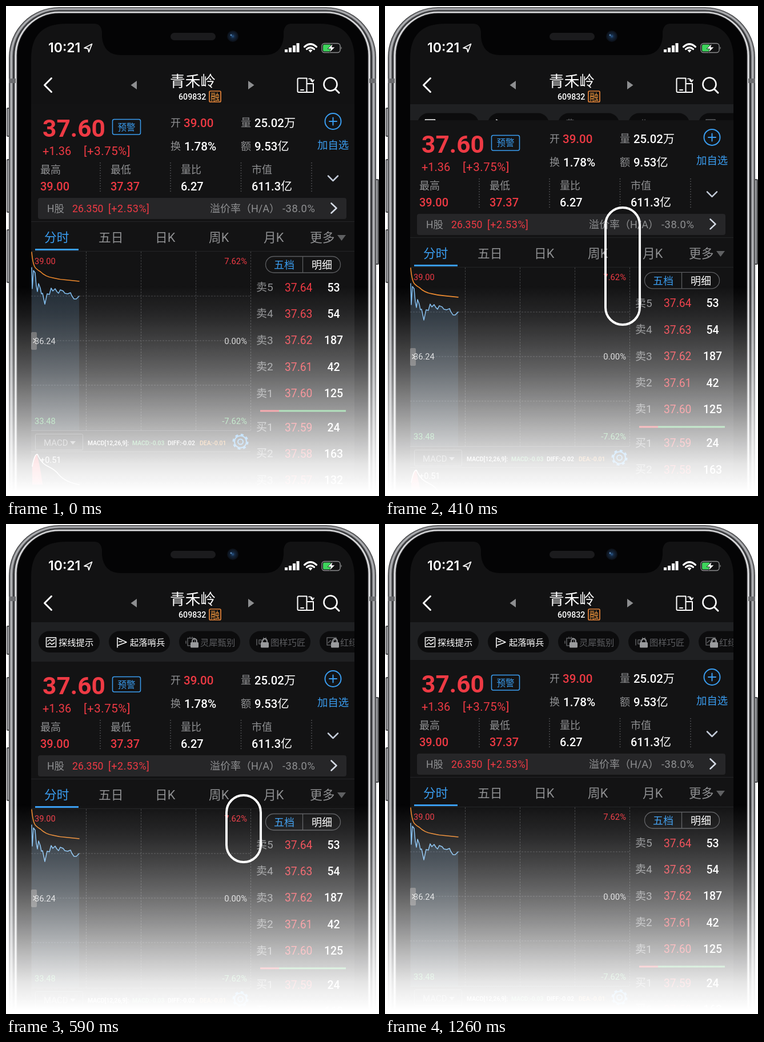
Write an HTML page that moves like this. It is 653 by 858 pixels and loops after 1.93 s.

```html
<!DOCTYPE html>
<html lang="zh-CN">
<head>
<meta charset="utf-8">
<title>Stock quote</title>
<style>
html, body { margin: 0; width: 100%; height: 100%; overflow: hidden; background: #fff; }
.stage { position: relative; width: 653px; height: 858px; overflow: hidden; }
svg { position: absolute; left: 0; top: 0; }
text { font-family: Roboto, "Noto Sans CJK SC", "Noto Sans CJK", sans-serif; }
.line { fill: none; stroke-linecap: round; stroke-linejoin: round; }
.red { fill: #ee3a44; }
.blue { fill: #3a9df0; }
.gray { fill: #8f9092; }
.white { fill: #fff; }
.green { fill: #5fc474; }
.orange { fill: #f0963c; }
.dim { fill: #5c5d60; }
.mid { font-weight: 500; }
.bold { font-weight: 700; }
.end { text-anchor: middle; }
.right { text-anchor: end; }

#sheet, #touch, .ring { animation: 1930ms linear -2ms infinite; }
#sheet { animation-name: pull; }
#touch { animation-name: tap; opacity: 0; }
.ring {
  position: absolute; left: 384px; width: 64px; box-sizing: border-box;
  border: 4px solid #fff; border-radius: 32px; opacity: 0;
  animation-name: show, head, tail;
}
/* percentages are ms / 19.3 */
@keyframes pull {
  0%, 16.5803% { transform: translateY(0); }
  16.5803% { animation-timing-function: steps(5, end); }
  24.3523% { transform: translateY(45px); animation-timing-function: step-end; }
  25.9067% { transform: translateY(51px); animation-timing-function: steps(3, end); }
  30.5699% { transform: translateY(69px); animation-timing-function: step-end; }
  32.1244%, 100% { transform: translateY(66px); }
}
@keyframes show {
  0% { opacity: 0; animation-timing-function: step-end; }
  5.1813% { opacity: 1; animation-timing-function: step-end; }
  40.4145%, 100% { opacity: 0; }
}
@keyframes head {
  0%, 24.3523% { top: 351px; }
  24.3523% { animation-timing-function: steps(6, end); }
  33.6788%, 100% { top: 530px; }
}
@keyframes tail {
  0%, 8.8083% { bottom: 443px; }
  8.8083% { animation-timing-function: steps(10, end); }
  24.3523%, 100% { bottom: 264px; }
}
@keyframes tap {
  0% { opacity: 0; animation-timing-function: step-end; }
  49.2228% { opacity: .6; transform: translate(138.5px, 206px) scale(1.18); animation-timing-function: step-end; }
  54.4041% { opacity: 1; transform: translate(138.5px, 206px) scale(1); animation-timing-function: steps(7, end); }
  65.285%, 100% { opacity: 0; transform: translate(138.5px, 221.5px) scale(1.28); }
}
</style>
</head>
<body>
<div class="stage">
<svg width="653" height="858" viewBox="0 0 653 858">
  <defs>
    <clipPath id="screen"><rect x="44" y="172" width="566" height="700"/></clipPath>
    <linearGradient id="fade" gradientUnits="userSpaceOnUse" x1="0" y1="490" x2="0" y2="850">
      <stop offset="0" stop-color="#fff" stop-opacity="0"/>
      <stop offset=".14" stop-color="#fff" stop-opacity=".085"/>
      <stop offset=".27" stop-color="#fff" stop-opacity=".2"/>
      <stop offset=".42" stop-color="#fff" stop-opacity=".35"/>
      <stop offset=".58" stop-color="#fff" stop-opacity=".54"/>
      <stop offset=".78" stop-color="#fff" stop-opacity=".79"/>
      <stop offset=".87" stop-color="#fff" stop-opacity=".9"/>
      <stop offset="1" stop-color="#fff"/>
    </linearGradient>
    <linearGradient id="area" x1="0" y1="0" x2="0" y2="1">
      <stop offset="0" stop-color="#4f7da5" stop-opacity=".24"/>
      <stop offset="1" stop-color="#4f7da5" stop-opacity=".14"/>
    </linearGradient>
    <radialGradient id="lens">
      <stop offset="0" stop-color="#2a588c"/>
      <stop offset=".35" stop-color="#14273f"/>
      <stop offset="1" stop-color="#0b0e14"/>
    </radialGradient>
  </defs>

  <g id="body"></g>
  <path d="M44 872V92Q44 31 105 31H155Q166 31 168 45V54Q171 86 202 86H452Q483 86 486 54V45Q488 31 499 31H549Q610 31 610 92V872Z" fill="#121213"/>
  <rect x="288" y="47" width="79" height="13" rx="6.5" fill="#1b1b1d"/>
  <circle cx="397" cy="53" r="10" fill="url(#lens)"/>
  <circle cx="394" cy="51" r="1.4" fill="#5c8cbc"/>

  <g id="header">
    <path class="line" d="M150.500 66.500L137 73.500L143.500 74.500L145 80.500Z" stroke="#fff" stroke-width="1.8"/>
    <path class="white" d="M488 76h5v5h-5zM495 73h5v8h-5zM502 69h5v12h-5zM508.500 65h5v16h-5z"/>
    <g class="line" stroke="#fff" stroke-width="3.2" stroke-linecap="butt">
      <path d="M522.500 71.500Q533 62 543.500 71.500"/>
      <path d="M526.500 75.500Q533 70 539.500 75.500"/>
    </g>
    <path class="white" d="M529.500 77.500Q533 75 536.500 77.500L533 81.500Z"/>
    <rect x="553" y="65.500" width="32" height="16" rx="4.500" fill="none" stroke="#8b8c8e" stroke-width="1.4"/>
    <rect x="555" y="67.500" width="14" height="12" rx="2" fill="#3ed45c"/>
    <path d="M586.500 71q2.500 2.500 0 5z" fill="#8b8c8e"/>
    <path d="M572 66L563 75H568.500L566.500 81.500L576 72H570.500Z" class="white" stroke="#121213" stroke-width=".8"/>
    <g class="line" stroke="#fff">
      <path d="M79.500 126.500L67.500 138.500L79.500 150.500" stroke-width="3"/>
      <path d="M526.500 126.500H512.500Q510.500 126.500 510.500 128.500V149Q510.500 151 512.500 151H526.500V126.500M526.500 136H538V151H526.500M516 147H521" stroke-width="2"/>
      <path d="M530 127.500Q536 127 536.500 132M533.500 130L536.500 133L539 129.500" stroke-width="1.7"/>
      <circle cx="568" cy="137" r="11.500" stroke-width="2.6"/>
      <path d="M576.500 145.500L583 152" stroke-width="3"/>
    </g>
    <path d="M229 131V146L218.500 138.500ZM424 131V146L434.500 138.500Z" fill="#8d8e90"/>
    <rect x="356" y="149" width="20" height="19" rx="2" fill="none" stroke="#e8853a" stroke-width="1.7"/>
  </g>

  <g clip-path="url(#screen)">
    <rect x="44" y="172" width="566" height="100" fill="#1f2022"/>
    <g id="pills"></g>
    <g id="sheet">
      <rect x="44" y="172" width="566" height="720" fill="#131314"/>
      <rect x="186.500" y="198.500" width="49" height="26.500" rx="3" fill="none" stroke="#3a9df0" stroke-width="1.5"/>
      <g class="line" stroke="#3a9df0" stroke-width="2"><circle cx="572.500" cy="202" r="14"/><path d="M566 202H579M572.500 195.500V208.500"/></g>
      <path d="M165 274V327M288 274V327M411.500 274V327M535 274V327" stroke="#5a5b5d" stroke-width="1.5" stroke-dasharray="1.500 3"/>
      <path class="line" d="M564 297.500L572.500 306L581 297.500" stroke="#c3cbd8" stroke-width="2.5"/>
      <rect x="56" y="336" width="540" height="37" rx="4" fill="#262628"/>
      <path class="line" d="M569.500 345.500L578.500 354L569.500 362.500" stroke="#d5dbe5" stroke-width="2.600"/>
      <path d="M44 377.500H610M44 429.500H610" stroke="#242527"/>
      <path d="M580 401H595L587.500 411Z" fill="#5f6062"/>
      <rect x="51" y="425" width="76" height="3" fill="#3a9df0"/>

      <path d="M140.500 430V743M236.500 430V743M332.500 430V743M428.500 430V743M44 508H428M44 586H428M44 664H428" stroke="#424345" stroke-dasharray="3 2"/>
      <path d="M44 743.500H428M44 780.500H428" stroke="#424345"/>
      <path id="fill" fill="url(#area)"/>
      <path id="price" class="line" stroke="#7fbdf0" stroke-width="1.500"/>
      <path class="line" d="M45 431Q47 454 52 459Q56 463 60 465Q69 474 82 476Q94 479 104 479.500L128 482" stroke="#f08a2c" stroke-width="1.600"/>
      <rect x="44" y="571" width="10" height="31" rx="2" fill="#5d5e60"/>
      <path class="line" d="M48 582.500L52 586L48 589.500" stroke="#ddd" stroke-width="1.400"/>

      <rect x="454.500" y="438.500" width="131" height="28.500" rx="14.250" fill="none" stroke="#5b5c5f" stroke-width="1.300"/>
      <path d="M519.500 439V467" stroke="#5b5c5f" stroke-width="1.300"/>
      <path d="M445 709H478" stroke="#ee3a44" stroke-width="3"/>
      <path d="M478 709H595" stroke="#4fbd66" stroke-width="3"/>

      <rect x="51.500" y="749.500" width="83" height="28" rx="2" fill="none" stroke="#55565a"/>
      <path d="M112 762H122L117 768Z" fill="#8f9092"/>
      <g class="line" stroke="#3a9df0" stroke-width="2"><circle cx="410.500" cy="763" r="4.500"/><circle cx="410.500" cy="763" r="10.500"/></g>
      <circle cx="410.500" cy="763" r="12.500" fill="none" stroke="#3a9df0" stroke-width="3" stroke-dasharray="4.900 4.918"/>
      <path d="M46 838V806Q50 786 54 784Q60 806 64 838Z" fill="#ee3a44"/>
      <path class="line" d="M46 806Q50 784 55 785C67 812 78 802 92 820Q104 834 128 838" stroke="#fff" stroke-width="1.600"/>
    </g>
  </g>
  <rect y="485" width="653" height="373" fill="url(#fade)"/>
  <g id="touch">
    <circle r="59.500" fill="#fff" opacity=".36"/>
    <circle r="37" fill="#fff" opacity=".78"/>
  </g>
</svg>
<div class="ring"></div>
</div>
<script>
const $ = id => document.getElementById(id);
const add = (id, markup) => $(id).insertAdjacentHTML('beforeend', markup);
const text = (id, x, y, size, cls, str, extra = '') =>
  add(id, `<text x="${x}" y="${y}" font-size="${size}" class="${cls}" ${extra}>${str}</text>`);
const box = (x, y, w, h, r, fill) =>
  `<rect x="${x}" y="${y}" width="${w}" height="${h}" rx="${r}" fill="${fill}"/>`;

// Phone: side keys, then nested metal bands around the black bezel
for (const [x, y, h] of [[1, 178, 51], [1, 268, 94], [1, 391, 94], [646, 303, 150]]) {
  add('body', box(x, y, 7, h, 2, '#4b4c4e') + box(x + 1.5, y + 2, 3, h - 4, 1, '#a4a5a8'));
}
const bands = [[0, '#3c3d3f'], [1.5, '#8e8f92'], [3.5, '#b4b5b8'], [6, '#5c5d60'], [8, '#2a2b2d'], [10, '#c9cacc'], [12, '#e6e6e8'], [13.5, '#2a2a2c'], [15, '#040405']];
for (const [d, fill] of bands) {
  add('body', box(5 + d, 2 + d * .75, 643 - 2 * d, 960, 88 - d, fill));
}
add('body', box(5, 127, 12, 8, 0, '#6c6d70') + box(636, 127, 12, 8, 0, '#6c6d70'));

text('header', 74, 81, 23, 'white', '10:21', 'style="font-family:Inter,sans-serif;font-weight:600"');
text('header', 287, 141, 26.7, 'white', '青禾岭');
text('header', 302, 164, 14.2, 'white mid', '609832');
text('header', 366, 164.500, 16, 'orange end', '融');

// Tool pills
const icons = [
  'M70.500 199H87.500V215H70.500ZM73 205L77 202L80 205L85 202M73 211L77 208L80 211L85 208',
  'M195 199V216M195 199.500L211 207L195 213M198 206H203',
  'M318 200H330V213H318ZM315 205V209M333 203V206M322 198V200M326 198V200',
  'M439 202V212M443 203H447V210H443ZM451 199V204M455 199V204',
  'M562 199H578V212H562ZM564 208L568 204L572 207L576 202'
];
['探线提示', '起落哨兵', '灵犀甄别', '图样巧匠', '红绿'].forEach((name, i) => {
  const x = 57 + 123 * i, locked = i > 1;
  add('pills', box(x, 187.5, 107, 37.5, 18.75, '#0c0c0d') +
    `<path class="line" d="${icons[i]}" stroke="${locked ? '#5c5d60' : '#fff'}" stroke-width="1.5"/>`);
  if (locked) {
    add('pills', box(x + 20, 207, 14, 9.5, 1.5, '#9a9b9d') +
      `<path class="line" d="M${x + 23} 207V205a4 4 0 0 1 8 0V207" stroke="#9a9b9d" stroke-width="1.8"/>`);
  }
  text('pills', [92, 217, 340, 463, 585][i], 212.5, 15.3, locked ? 'dim' : 'white', name);
});

// Quote summary, tabs and chart labels
const wide = 'letter-spacing=".55"';
const labels = [
  [64, 229, 42.5, 'red bold', '37.60'],
  [211, 217.5, 15.5, 'blue end', '预警'],
  [64, 261, 20, 'red', '+1.36'],
  [136, 261, 20.5, 'red', '[+3.75%]', wide],
  [288, 211, 18, 'gray', '开'], [311, 212, 20.5, 'red mid', '39.00'],
  [411, 211, 18, 'gray', '量'], [435, 212, 20.3, 'white mid', '25.02万'],
  [288, 252, 18, 'gray', '换'], [312, 253, 20.7, 'white mid', '1.78%'],
  [411, 252, 18, 'gray', '额'], [435, 253, 20.3, 'white mid', '9.53亿'],
  [545, 249.5, 18.4, 'blue', '加自选'],
  [60, 293, 18, 'gray', '最高'], [183, 293, 18, 'gray', '最低'],
  [306, 293, 18, 'gray', '量比'], [430, 293, 18, 'gray', '市值'],
  [60, 323, 20, 'red mid', '39.00'], [183, 323, 20, 'red mid', '37.37'],
  [306, 323, 20, 'white mid', '6.27'], [430, 323, 20, 'white mid', '611.3亿'],
  [72, 361, 17.5, 'gray', 'H股'], [116, 361, 17.7, 'red', '26.350'],
  [179, 361, 18, 'red', '[+2.53%]', wide],
  [357, 361, 18, 'gray', '溢价率（H/A）'], [484, 361, 18.3, 'gray', '-38.0%', wide],
  [67, 413, 21.7, 'blue mid', '分时'],
  [162, 413, 21.7, 'gray', '五日'], [261, 413, 21.7, 'gray', '日K'],
  [355, 413, 21.7, 'gray', '周K'], [451, 413, 21.7, 'gray', '月K'],
  [532, 413, 21.7, 'gray', '更多'],
  [50, 452, 14.6, 'red', '39.00'], [422, 452, 14.8, 'red right', '7.62%'],
  [50, 591.5, 14.6, 'white', '36.24', 'opacity=".8"'],
  [422, 591.5, 14.8, 'white right', '0.00%', 'opacity=".8"'],
  [50, 731.5, 14.6, 'green', '33.48'], [422, 731.5, 14.8, 'green right', '-7.62%'],
  [487, 460, 18, 'blue end', '五档'], [553, 460, 18, 'white end', '明细'],
  [66, 770, 15, 'gray', 'MACD'],
  [143, 769, 10.4, 'white mid', 'MACD[12,26,9]:'], [221, 769, 10.4, 'green mid', 'MACD:-0.03'],
  [283, 769, 10.4, 'white mid', 'DIFF:-0.02'], [339, 769, 10.4, 'orange mid', 'DEA:-0.01'],
  [60, 800, 14.5, 'white', '+0.51']
];
labels.forEach(l => text('sheet', ...l));

// Order book
const volumes = [53, 54, 187, 42, 125, 24, 163, 132];
volumes.forEach((volume, i) => {
  const ask = i < 5;
  const y = ask ? 499 + 46.4 * i : 744 + 46.4 * (i - 5);
  text('sheet', 438, y, 19, 'gray', ask ? '卖' + (5 - i) : '买' + (i - 4));
  text('sheet', 488, y + .5, 19.3, 'red', (37.64 - i * .01).toFixed(2));
  text('sheet', 573.5, y + .5, 19.5, 'white mid end', volume);
});

const trace = '45 458 46 495 48 463 51 467 53 490 55 500 57 486 60 494 62 504 64 503 68 522 72 504 76 505 79 494 82 499 86 495 89 500 92 503 95 497 100 499 103 503 108 504 113 502 115 507 119 513 123 513 128 508';
$('price').setAttribute('d', 'M' + trace);
$('fill').setAttribute('d', `M${trace}V743H45Z`);
</script>
</body>
</html>
```
